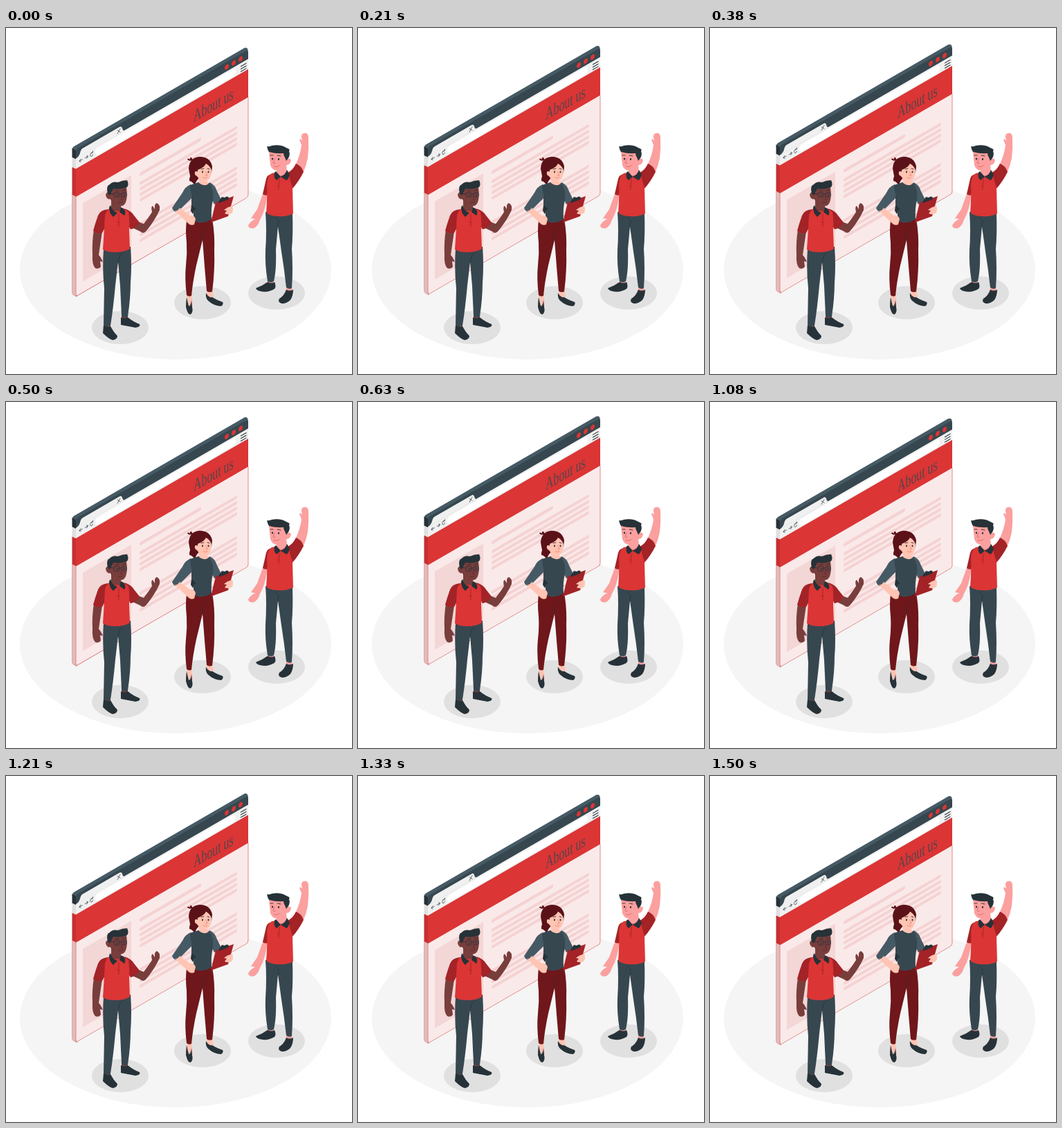
Recreate the animation shown at these times as an HTML page. Size 500 by 500 pixels, loop 1540 ms.

```html
<!DOCTYPE html>
<html lang="en">
<head>
<meta charset="utf-8">
<title>About us</title>
<style>
  html, body { margin: 0; width: 100%; height: 100%; overflow: hidden; background: #fff; }
  svg { display: block; width: 100%; height: 100%; }
  .red { fill: #db3535 } .deep { fill: #a32327 } .wine { fill: #6f171b }
  .slate { fill: #37474f } .ink { fill: #263238 } .steel { fill: #455a64 }
  .brown { fill: #783e3c } .peach { fill: #ffc4b3 } .pink { fill: #fc9f9f }
  .hair { fill: #5a1218 } .shadow { fill: #e0e0e0 } .bar { fill: #f5d2d2 }
  .line { fill: none; stroke: #263238; stroke-linecap: round; stroke-linejoin: round }
  text { font-family: "Liberation Serif", serif }
</style>
</head>
<body>
<svg viewBox="0 0 500 500">
  <defs><clipPath id="pane"><rect y="-2" width="249" height="213" rx="3.5"/></clipPath></defs>
  <ellipse cx="245" cy="349.5" rx="225" ry="129.5" fill="#f5f5f5"/>
  <g class="shadow">
    <ellipse cx="165" cy="433" rx="41" ry="24"/>
    <ellipse cx="284" cy="397" rx="41" ry="24"/>
    <ellipse cx="391" cy="383" rx="41" ry="24"/>
  </g>

  <g id="window">
    <path class="steel" d="M95.5 176Q95.5 172.7 98 171.200L343 29.700Q346 27.500 349 29.700L350 34L103 180Z"/>
    <g transform="matrix(1 .5 0 1 95.5 174)">
      <path class="ink" d="M0 0H7V13H0Z"/>
      <path fill="#e0e0e0" d="M0 13H7V27H0Z"/>
      <path fill="#c72f2f" d="M0 27H7V67H0Z"/>
      <path fill="#e2bcbc" stroke="#d98080" stroke-width=".5" d="M0 67H7V211H3Q0 211 0 208Z"/>
    </g>
    <g transform="matrix(1 -.578 0 1 101 177)">
      <g clip-path="url(#pane)">
        <rect width="249" height="211" fill="#fae9e9"/>
        <rect y="-2" width="249" height="14" class="slate"/>
        <rect y="11.600" width="249" height="15" fill="#f0f0f0"/>
        <rect y="26.500" width="249" height="40.500" class="red"/>
      </g>
      <path fill="none" stroke="#d97070" stroke-width=".8" d="M0 67V208Q0 211 3 211H246Q249 211 249 208V67"/>
      <path fill="#f0f0f0" d="M0 12Q5 11 6 7Q7 2.500 10 2.500H63Q66 2.500 67 6.500Q68 11.800 71 12Z"/>
      <rect x="28" y="14" width="203" height="10.5" rx="5" fill="#fff"/>
      <g class="line" stroke="#455a64" stroke-width=".6">
        <path d="M60 5.500L64 10.500M64 5.500L60 10.500M9.500 18.500H5L7 16.500M5 18.500L7 20.500M13 18.500H17.500L15.500 16.500M17.500 18.500L15.500 20.500M24 16.500A2 2.800 0 1 0 24.500 20M24.500 15V17H22.500"/>
        <path stroke-width="1.200" d="M238.500 16.300H246M238.500 20H246M238.500 23.700H246"/>
      </g>
      <g class="red">
        <ellipse cx="218" cy="5.300" rx="3" ry="3.600"/>
        <ellipse cx="228" cy="5.300" rx="3" ry="3.600"/>
        <ellipse cx="238" cy="5.300" rx="3" ry="3.600"/>
      </g>
      <text transform="translate(170 57) scale(.635 1)" font-size="25" fill="#37474f" fill-opacity=".8">About us</text>
      <rect x="10" y="82" width="70" height="113" fill="#f3d6d6"/>
      <rect x="92" y="85.500" width="89" height="5" rx="2" class="bar"/>
      <g id="lines" class="bar"></g>
    </g>
  </g>

  <g id="left-man">
    <path class="brown" d="M127 291Q124 311 125 327Q124 342 129 347Q134 349 137 345L136 337L140 338Q137 331 134 328L139 294Z"/>
    <path class="brown" d="M191 280L199 283Q206 274 211 266Q209 258 212 257L215 262Q214 254 218 253Q223 255 222 263L218 271Q210 285 202 294Q198 298 194 294L179 287Z"/>
    <path class="brown" d="M142 426H151V435H142ZM167 412H176V423H167Z"/>
    <path class="ink" d="M141 429Q147 434 151 431Q155 439 161 445Q161 450 154 451Q148 449 140 441ZM166 418Q172 421 176 418Q183 424 193 428Q195 432 187 433L166 429Z"/>
    <path class="slate" d="M141 319L180 316Q182 344 180 368Q180 390 176 417Q171 420 167 416L165 373L162 338L158 372Q155 405 151 430Q146 433 141 429L142 376Q139 349 141 319Z"/>
    <path class="line" stroke-width=".7" d="M162 340L164 329L169 325"/>
    <path class="deep" d="M147 262Q136 263 133 271Q129 282 126 293Q132 298 139 296L147 281ZM171 261Q181 264 185 271L193 281Q188 289 180 291L173 279Z"/>
    <path class="red" d="M147 262L154 259L170 261L177 266Q179 280 178 292L179 319Q172 324 157 324Q146 324 140 320Q142 290 143 270Z"/>
    <path class="brown" d="M152 248L166 254L166 263Q158 268 152 259Z"/>
    <path class="ink" d="M151 256Q154 265 161 267L155 273Q149 268 149 259ZM166 259L170 261Q174 266 171 271L164 266Z"/>
    <path fill="none" stroke="#a32327" stroke-width=".8" d="M163 269V287M160 280L164 281"/>
    <path class="brown" d="M151 231Q163 226 174 230Q176 244 173 252Q170 259 163 257Q155 254 151 248Q145 248 144 241Q146 235 151 238Z"/>
    <path class="ink" d="M147 239Q144 228 150 226Q154 221 162 223Q168 220 175 220Q178 226 175 230Q166 234 155 232L152 238L150 242Z"/>
    <g class="line" stroke-width=".8">
      <rect x="156" y="237.500" width="8" height="7" rx="3"/>
      <rect x="167" y="237.500" width="7.500" height="6.500" rx="3"/>
      <path d="M164 240L167 239.500M149 239L156 240M158 235L163 235.500M168 235L173 234"/>
      <path stroke="#552b2c" d="M166 243L168 248L165 248.500M162 252Q166 254 169 251"/>
    </g>
    <path class="ink" d="M160 240h1.500v2.500h-1.500ZM170 239.500h1.500v2.500h-1.500Z"/>
    <circle cx="150" cy="248" r="1" fill="#e0e0e0"/>
  </g>

  <g id="woman">
    <path class="peach" d="M261 382H268L270 402L263 406ZM290 376H298L300 390L290 388Z"/>
    <path class="ink" d="M261 389Q260 397 260 403Q262 413 266 414Q271 412 269 403L268 393Q267 402 264 402ZM289 383Q288 390 292 394Q301 402 311 402Q315 399 313 396Q304 393 298 389Q293 390 289 383Z"/>
    <path class="wine" d="M261 278L298 276Q302 298 301 322Q302 350 298 381Q293 383 290 380L287 345L284 306L275 343Q270 366 268 387Q264 389 261 386Q258 362 260 343Q262 326 261 310Q259 292 261 278Z"/>
    <path class="line" stroke="#4b0d11" stroke-width=".7" d="M284 308L285 293L290 288"/>
    <path class="hair" d="M270 191Q263 193 262 189Q264 188 266 190Q265 187 268 187ZM272 209Q264 213 265 221Q270 222 273 228Q274 221 279 217Z"/>
    <path class="steel" d="M267 226Q259 229 255 238L240 260Q242 266 248 266L268 246Z"/>
    <path class="steel" d="M294 223Q302 226 305 236L312 250L301 255L294 240Z"/>
    <path class="slate" d="M266 227L278 223L294 224Q301 234 299 249Q296 260 297 276Q288 283 277 281Q273 280 271 276Q272 268 268 262Q268 255 268 247Z"/>
    <path class="ink" d="M268 256L275 262Q270 262 270 269L267 264Z"/>
    <path class="peach" d="M244 264Q248 265 251 260L266 271Q272 270 274 276L272 284Q266 286 263 282Z"/>
    <path class="peach" d="M278 214L289 219L293 225Q286 230 279 224Z"/>
    <path class="hair" d="M264 203Q265 187 280 186Q295 186 298 200L297 209L276 213Q270 219 266 214Z"/>
    <path class="peach" d="M277 205Q286 202 289 196Q295 199 297 206Q297 219 288 222Q280 221 276 214Q272 213 273 208Q275 206 277 208Z"/>
    <g class="line" stroke-width=".9">
      <path d="M282 204L286 203M291 203L294 204"/>
      <path stroke="#e98879" d="M289 208L291 213L288 213M285 216Q288 218 291 216"/>
    </g>
    <ellipse class="ink" cx="284" cy="208" rx="1" ry="1.400"/><ellipse class="ink" cx="292.500" cy="208" rx="1" ry="1.400"/>
    <path class="deep" d="M303 252L329 243L321 272L296 281Z"/>
    <path class="ink" d="M308 250L312 244L316 245Q320 242 322 245L321 248L307 253Z"/>
    <path class="peach" d="M315 263Q319 259 327 257Q329 262 327 267Q322 271 316 268L319 264Z"/>
  </g>

  <g id="right-man">
    <path class="pink" d="M372 237L363 262L354 275L360 276Q351 281 350 286Q352 291 359 289Q365 285 367 277Q374 266 378 241Z"/>
    <path class="pink" d="M418 199Q426 181 427 169L424 162Q425 159 428 163Q425 152 431 152Q436 151 437 157Q438 173 436 188Q434 199 429 210Z"/>
    <path class="pink" d="M378 362H387V371H378ZM405 372H413V383H405Z"/>
    <path class="ink" d="M378 367Q384 370 388 367Q391 374 388 377Q380 382 371 381Q362 380 361 376Q370 373 378 367ZM405 378Q410 381 415 378Q415 387 411 393Q405 399 398 398Q392 396 395 391Q402 387 405 378Z"/>
    <path class="slate" d="M375 266L414 268Q415 297 413 319Q415 348 413 376Q409 378 405 375Q402 348 398 323L393 287L390 320Q391 350 387 366Q382 369 378 366Q374 342 375 321Q377 293 375 266Z"/>
    <path class="line" stroke-width=".7" d="M393 288L394 279L389 274"/>
    <path class="deep" d="M385 211Q377 212 376 218L371 240Q374 243 380 241ZM407 209Q415 205 419 196Q427 199 430 208Q423 222 414 232L406 228Z"/>
    <path class="red" d="M384 210L404 206L408 208Q410 219 414 231L415 268Q407 273 393 272Q382 272 376 267Q378 242 377 226Q378 213 384 210Z"/>
    <path class="pink" d="M391 200L405 196L406 208Q400 216 391 213Z"/>
    <path class="ink" d="M390 207L397 215L391 220Q386 216 388 209ZM406 205L410 212Q408 219 405 220L397 215Q404 212 406 205Z"/>
    <path fill="none" stroke="#a32327" stroke-width=".8" d="M395 218L394 234M392 228L395 229"/>
    <path class="pink" d="M380 179Q392 173 404 180L406 190Q411 186 412 192Q410 198 405 198Q400 207 391 206Q384 205 382 198Z"/>
    <path class="ink" d="M377 171Q380 172 384 170Q396 168 403 172L407 174Q411 175 409 178Q411 183 408 188L405 192L403 187Q401 184 401 181Q390 182 380 179Q378 176 377 171Z"/>
    <g class="line" stroke-width=".9">
      <path d="M382 184L386 184M392 184L397 185"/>
      <path stroke="#d96d70" d="M388 189L386 195L389 195.500M387 200Q391 202 395 199"/>
    </g>
    <ellipse class="ink" cx="385" cy="189" rx="1.100" ry="1.500"/><ellipse class="ink" cx="394" cy="189.500" rx="1.100" ry="1.500"/>
  </g>
</svg>
<script>
  const LOOP = 1540, PEAK = 730, RISE = 10;
  const pane = document.getElementById('window');

  document.getElementById('lines').innerHTML = [0, 1, 2, 3, 4, 5, 6, 7].map(i => {
    const y = (i < 4 ? 99 : 125.5) + i * 8;
    return `<rect x="92" y="${y}" width="141" height="4.5" rx="2"/>`;
  }).join('');

  // Steady float: up to the peak, then down at the same speed.
  const height = t => {
    const gap = Math.abs(t - PEAK);
    return RISE * Math.min(gap, LOOP - gap) / (LOOP / 2);
  };
  const rest = height(0);

  function draw() {
    const t = performance.now() % LOOP;
    pane.setAttribute('transform', `translate(0 ${(height(t) - rest).toFixed(2)})`);
    requestAnimationFrame(draw);
  }
  draw();
</script>
</body>
</html>
```
